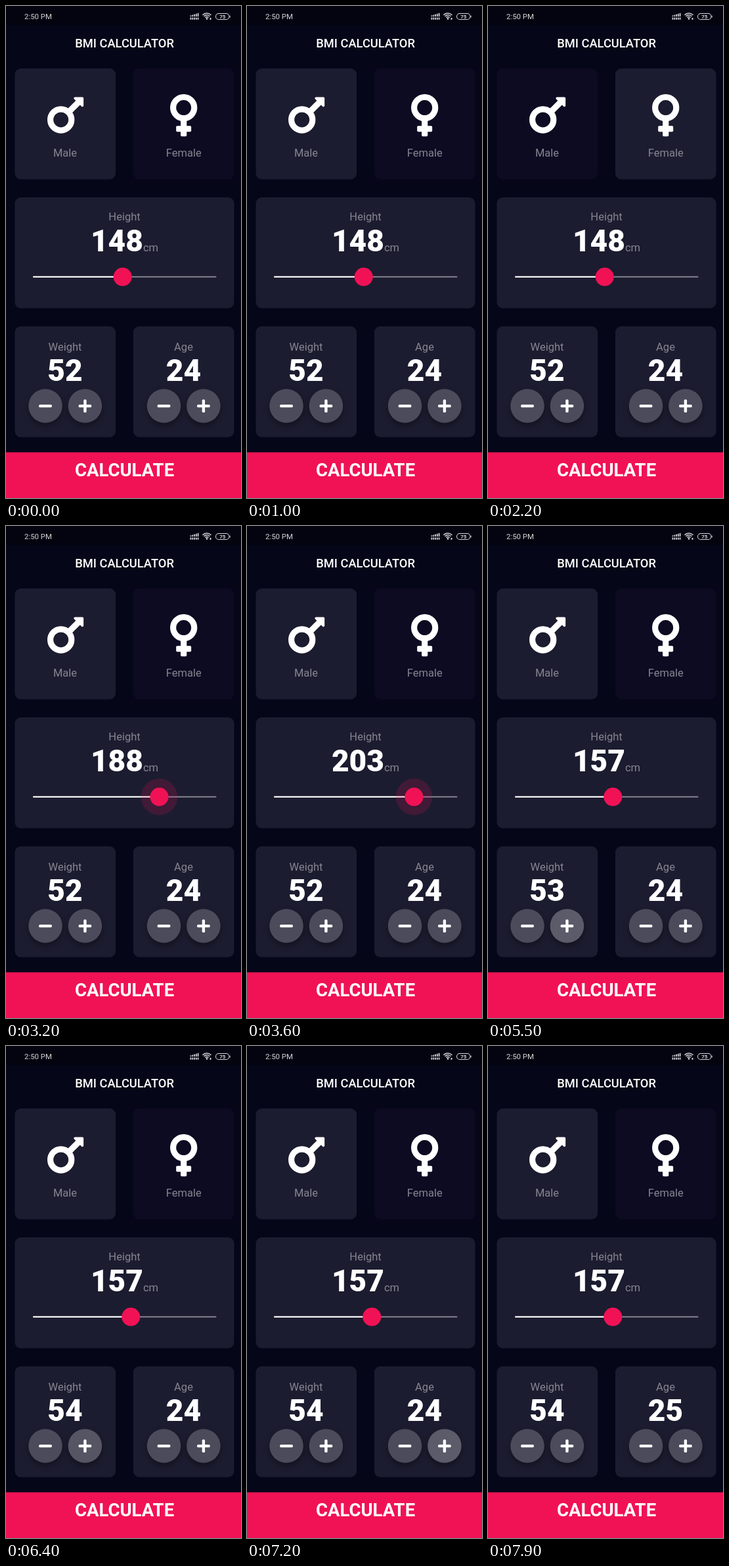
These frames come from a looping animation (358x748 px, 8 s). An HTML page with a canvas:

```html
<!DOCTYPE html>
<html lang="en">
<head>
<meta charset="utf-8">
<title>BMI Calculator</title>
<style>
html, body { margin: 0; width: 100%; height: 100%; overflow: hidden; background: #050719; }
canvas { display: block; width: 358px; height: 748px; }
</style>
</head>
<body>
<canvas id="stage"></canvas>
<script>
const W = 358, H = 748, LOOP = 8000;
const C = {
  bg: '#050719', bar: '#03040f', card: '#1c1c30', off: '#0c0b22',
  pink: '#f01255', grey: '#858591', button: '#4b4b5b', white: '#fff'
};
const canvas = document.getElementById('stage');
const ctx = canvas.getContext('2d');
const dpr = window.devicePixelRatio || 1;
canvas.width = W * dpr;
canvas.height = H * dpr;

const clamp = x => Math.min(1, Math.max(0, x));
const smooth = x => x * x * (3 - 2 * x);
const easeOut = x => 1 - Math.pow(1 - x, 2.3);

function rect(x, y, w, h, r, color) {
  ctx.fillStyle = color;
  ctx.beginPath();
  ctx.roundRect(x, y, w, h, r);
  ctx.fill();
}

function disc(x, y, r, color) {
  ctx.fillStyle = color;
  ctx.beginPath();
  ctx.arc(x, y, r, 0, Math.PI * 2);
  ctx.fill();
}

function setFont(weight, size) {
  ctx.font = `${weight} ${size}px Roboto, sans-serif`;
}

function text(str, x, y, size, weight, color, align = 'center') {
  setFont(weight, size);
  ctx.textAlign = align;
  ctx.fillStyle = color;
  ctx.fillText(str, x, y);
}

const label = (str, x, y) => text(str, x, y, 16.5, 400, C.grey);

function statusBar() {
  const ink = '#d4d4da';
  rect(0, 0, W, 29, 0, C.bar);
  text('2:50 PM', 28, 20, 11.4, 400, ink, 'left');

  for (let i = 0; i < 5; i++) {
    const x = 280.5 + i * 2.8, h = 1.6 + i * 0.9;
    rect(x, 16 - h, 1.8, h, 0, ink);
    rect(x, 17.5, 1.8, 3.2, 0, ink);
  }

  ctx.strokeStyle = ink;
  ctx.lineWidth = 1.5;
  for (const r of [3.4, 6.2, 9]) {
    ctx.beginPath();
    ctx.arc(306, 20, r, -Math.PI * 0.76, -Math.PI * 0.24);
    ctx.stroke();
  }
  disc(306, 19.4, 1.3, ink);
  rect(310.5, 18, 2, 2.8, 0, ink);

  ctx.lineWidth = 1.1;
  ctx.beginPath();
  ctx.roundRect(319.5, 11.5, 20.5, 9, 4.5);
  ctx.stroke();
  rect(340.5, 14.5, 1.2, 3, 0.5, ink);
  text('75', 329.8, 19, 8, 700, ink);
}

// Both gender icons share one 512-unit grid.
function icon(x, y, draw) {
  ctx.save();
  ctx.translate(x, y);
  ctx.scale(0.1436, 0.1436);
  ctx.strokeStyle = ctx.fillStyle = C.white;
  ctx.lineWidth = 64;
  draw();
  ctx.restore();
}

function ring(x, y) {
  ctx.beginPath();
  ctx.arc(x, y, 112, 0, Math.PI * 2);
  ctx.stroke();
}

function male() {
  ring(144, 304);
  ctx.beginPath();
  ctx.moveTo(224, 224);
  ctx.lineTo(336, 112);
  ctx.stroke();
  ctx.lineJoin = 'round';
  ctx.lineWidth = 24;
  ctx.beginPath();
  ctx.moveTo(293, 76);
  ctx.lineTo(372, 76);
  ctx.lineTo(372, 155);
  ctx.closePath();
  ctx.fill();
  ctx.stroke();
}

function female() {
  ring(144, 176);
  rect(112, 300, 64, 180, 12, C.white);
  rect(64, 368, 160, 64, 12, C.white);
}

function genderCards(femaleOn) {
  rect(13.5, 95, 153.5, 168.5, 9, femaleOn ? C.off : C.card);
  rect(194, 95, 153.5, 168.5, 9, femaleOn ? C.card : C.off);
  icon(63, 129.3, male);
  icon(250, 129.3, female);
  label('Male', 90, 229);
  label('Female', 270.7, 229);
}

function heightAt(t) {
  if (t < 3600) return 148 + 55 * easeOut(clamp((t - 2900) / 700));
  if (t < 4170) return 203 - 86 * smooth((t - 3600) / 570);
  return 117 + 40 * smooth(clamp((t - 4170) / 230));
}

function heightCard(t) {
  rect(13.5, 291, 334, 168.5, 9, C.card);
  label('Height', 180.5, 326);

  const value = Math.round(heightAt(t));
  setFont(900, 46);
  const wNum = ctx.measureText(value).width;
  setFont(400, 16.5);
  const wUnit = ctx.measureText('cm').width;
  const left = 180.5 - (wNum + wUnit) / 2;
  text(value, left, 373, 46, 900, C.white, 'left');
  text('cm', left + wNum, 373, 16.5, 400, C.grey, 'left');

  const x = 41 + (value - 50) * 1.395, y = 411.8;
  rect(41, y - 1, 279.5, 2, 1, C.grey);
  rect(41, y - 1, x - 41, 2, 1, C.white);
  const press = clamp((t - 2840) / 120) * (1 - clamp((t - 4400) / 120));
  if (press > 0) disc(x, y, 27.8 * press, 'rgba(240,18,85,0.17)');
  disc(x, y, 14, C.pink);
}

function button(x, plus, glow) {
  const y = 608;
  ctx.save();
  ctx.shadowColor = 'rgba(0,0,0,0.4)';
  ctx.shadowBlur = 8 * dpr;
  ctx.shadowOffsetY = 4 * dpr;
  disc(x, y, 25.8, C.button);
  ctx.restore();
  if (glow > 0) disc(x, y, 25.8, `rgba(255,255,255,${0.09 * glow})`);
  rect(x - 9.8, y - 2.1, 19.6, 4.4, 1.5, C.white);
  if (plus) rect(x - 2.2, y - 9.7, 4.4, 19.6, 1.5, C.white);
}

function counterCard(x, name, value, glow) {
  rect(x - 76.5, 487, 153.5, 168.5, 9, C.card);
  label(name, x, 524.3);
  text(value, x, 570.3, 46, 900, C.white);
  button(x - 30, false, 0);
  button(x + 30.4, true, glow);
}

const tapGlow = (t, start) =>
  t < start ? 0 : 1 - clamp((t - start - 100) / 250);

function render(t) {
  ctx.setTransform(dpr, 0, 0, dpr, 0, 0);
  rect(0, 0, W, H, 0, C.bg);
  statusBar();
  text('BMI CALCULATOR', 180.5, 62.8, 18.3, 500, C.white);

  genderCards(t >= 1200 && t < 2300);
  heightCard(t);

  const weight = 52 + (t >= 5500) + (t >= 6300);
  const age = 24 + (t >= 7300);
  const weightGlow = Math.max(tapGlow(t, 5480), tapGlow(t, 6200));
  counterCard(90, 'Weight', weight, weightGlow);
  counterCard(270.5, 'Age', age, tapGlow(t, 7200));

  rect(0, 678.5, W, 70, 0, C.pink);
  text('CALCULATE', 180.5, 715.3, 27.5, 700, C.white);
}

const start = performance.now();
function frame() {
  render((performance.now() - start) % LOOP);
  requestAnimationFrame(frame);
}
frame();
</script>
</body>
</html>
```
